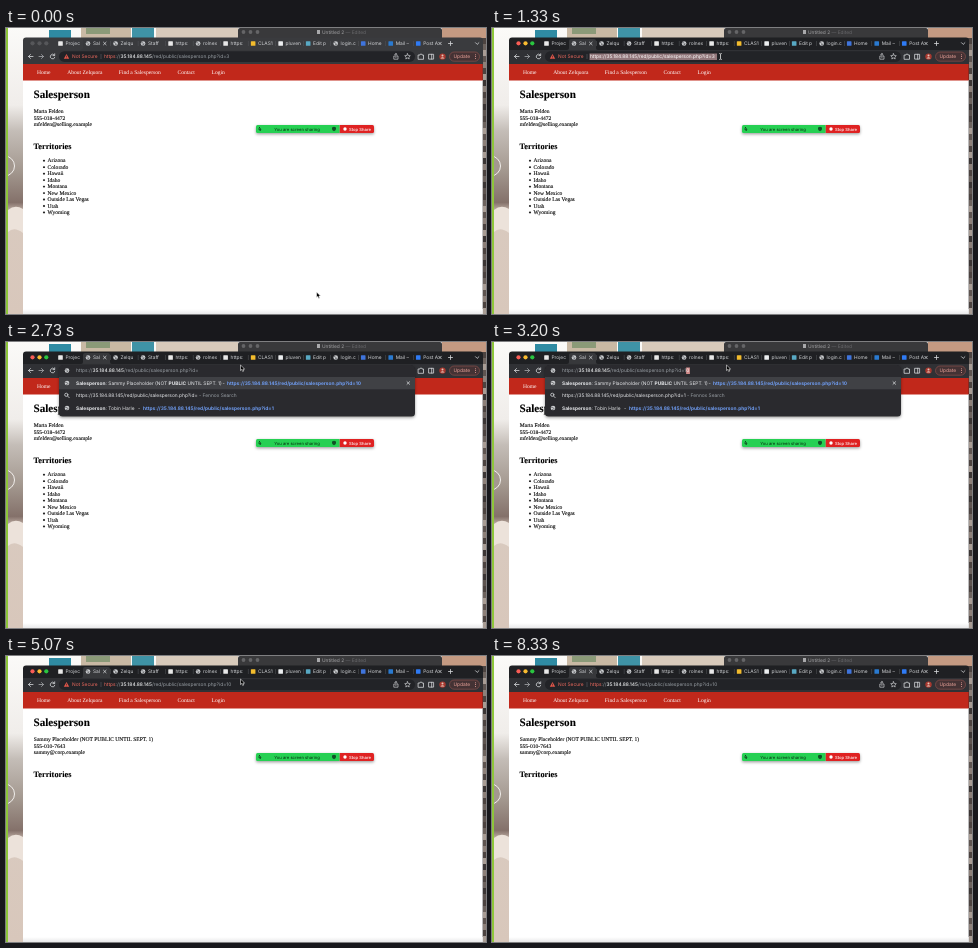
Animation of 480x286 px, one loop 8.54 s. Source, as an HTML page:

```html
<!DOCTYPE html>
<html lang="en">
<head>
<meta charset="utf-8">
<title>Salesperson</title>
<style>
html, body { margin: 0; width: 100%; height: 100%; overflow: hidden; background: #fff; }
svg { display: block; width: 480px; height: 286px; }
text { white-space: pre; text-rendering: geometricPrecision; }
.ui { font-family: Inter, "Open Sans", sans-serif; font-size: 4.85px; }
.page { font-family: "Liberation Serif", serif; font-size: 5.55px; }
.ink { stroke: #000; stroke-width: .1; }
.b { font-weight: 700; }
.line { fill: none; stroke: #d5d7da; stroke-width: .8; stroke-linecap: round; stroke-linejoin: round; }
</style>
</head>
<body>
<svg viewBox="0 0 480 286" xmlns="http://www.w3.org/2000/svg">
  <defs>
    <linearGradient id="wall" x2="0" y2="1">
      <stop offset="0" stop-color="#fbfaf8"/>
      <stop offset=".27" stop-color="#f0edea"/>
      <stop offset=".36" stop-color="#c4bdb7"/>
      <stop offset=".5" stop-color="#a3988f"/>
      <stop offset=".61" stop-color="#84716a"/>
      <stop offset=".65" stop-color="#d9cabf"/>
      <stop offset="1" stop-color="#d8c7bb"/>
    </linearGradient>
    <linearGradient id="foot" x2="0" y2="1">
      <stop offset="0" stop-color="#fff"/>
      <stop offset="1" stop-color="#e9e9ea"/>
    </linearGradient>
    <filter id="soft" x="-10%" y="-40%" width="120%" height="200%">
      <feDropShadow dx="0" dy="1.2" stdDeviation="1.6" flood-opacity=".4"/>
    </filter>
    <g id="globe">
      <circle r="2.3" fill="#d0d2d5"/>
      <path d="M-1.8-.6C-.7-1.6-.2.2.5-.2M-.6 1.7C-.4.7.7 1.2 1.4.4" fill="none" stroke="#3a3b3e" stroke-width=".75"/>
    </g>
  </defs>

  <rect width="480" height="286" fill="url(#wall)"/>
  <g id="shelf"></g>
  <circle cx="-1.500" cy="138" r="10" fill="#a3988f" stroke="#f2efec" stroke-width="1"/>
  <path d="M2 182Q9 176 17 181V205Q8 198 2 204Z" fill="#ece2da"/>
  <rect width="2" height="286" fill="#8ec63a"/>

  <path d="M232 10V2Q232 0 234 0H434Q436 0 436 2V10Z" fill="#39393b"/>
  <g fill="#656567"><circle cx="237.500" cy="4" r="1.900"/><circle cx="244.500" cy="4" r="1.900"/><circle cx="251.500" cy="4" r="1.900"/></g>
  <rect x="311" y="2" width="3" height="4" fill="#a9a9ab"/>
  <text class="ui" x="316" y="5.800" fill="#a4a4a6">Untitled 2 <tspan fill="#69696c">— Edited</tspan></text>

  <path id="strip" d="M17 286V12.500Q17 9.500 20 9.500H474Q477 9.500 477 12.500V286Z"/>
  <g id="lights">
    <circle cx="26.500" cy="15.300" r="2.100" fill="#fa5d56"/>
    <circle cx="33.500" cy="15.300" r="2.100" fill="#f9bb30"/>
    <circle cx="40.300" cy="15.300" r="2.100" fill="#2ac640"/>
  </g>
  <g id="dimmed" fill="#56575a">
    <circle cx="26.500" cy="15.300" r="2.100"/><circle cx="33.500" cy="15.300" r="2.100"/><circle cx="40.300" cy="15.300" r="2.100"/>
  </g>
  <path d="M75 22Q77 22 77 20V13Q77 11 79 11H102Q104 11 104 13V20Q104 22 106 22Z" fill="#37383b"/>
  <rect id="bar" x="17" y="22" width="460" height="14.500"/>
  <g id="tabs"></g>
  <path class="line" d="M97.500 14.200l2.600 2.600m0-2.600l-2.600 2.600M432.700 14.200l2.600 2.600m0-2.600l-2.600 2.600M442.500 15.500h4m-2-2v4M469.500 14.700l1.700 1.700 1.700-1.700"/>

  <path class="line" d="M27 28.500h-4.500m2-2l-2 2 2 2M48.300 27a2.300 2.300 0 1 0 .5 2.300M48.700 25.800v1.800h-1.800"/>
  <path class="line" d="M33 28.500h4.500m-2-2l2 2-2 2" style="stroke:#a5a7ab"/>
  <rect x="53" y="23.300" width="356" height="10.600" rx="5.300" fill="#222327"/>

  <g id="address" class="ui">
    <path d="M60.500 26l2.700 4.800h-5.400Z" fill="#e4574a"/>
    <path d="M60.500 27.700v1.400m0 .5v.6" stroke="#222327" stroke-width=".6"/>
    <text x="66" y="30.300" fill="#ee6a5e">Not Secure</text>
    <path d="M95 26v5" stroke="#5f6165" stroke-width=".6"/>
    <rect id="marked" x="97.500" y="25.500" width="127.500" height="6.500" fill="#92777b"/>
    <text id="url" x="98" y="30.300"></text>
  </g>

  <path class="line" d="M388.800 28h-1v3.200h4.200V28h-1M389.900 29.500v-4m-1.200 1.200l1.200-1.200 1.200 1.200M401.500 25.700l.8 1.800 2 .2-1.500 1.400.4 1.900-1.700-1-1.700 1 .4-1.900-1.500-1.400 2-.2Z" style="stroke-width:.65"/>
  <path d="M412.500 27h1.500a1 1 0 0 1 2 0h1.500v4.300h-5Z" class="line"/>
  <path d="M423 26.300h4.600v4.800H423Zm2.700 0v4.800" class="line"/>
  <circle cx="436.500" cy="28.600" r="3.200" fill="#a8382f"/>
  <circle cx="436.500" cy="27.500" r="1" fill="#e4c9bd"/>
  <path d="M434.500 30.600q2-2.600 4 0Z" fill="#e4c9bd"/>
  <rect x="443.500" y="24" width="30" height="9.200" rx="4.600" fill="#443234" stroke="#96554f" stroke-width=".6"/>
  <text class="ui" x="447.500" y="30.300" fill="#eda49b">Update</text>
  <g fill="#eda49b"><circle cx="469.500" cy="26.700" r=".5"/><circle cx="469.500" cy="28.600" r=".5"/><circle cx="469.500" cy="30.500" r=".5"/></g>

  <path d="M17 52H476.700V286H17Z" fill="#fff"/>
  <rect x="17" y="281" width="459.700" height="5" fill="url(#foot)"/>
  <rect x="17" y="36" width="459.700" height="16.500" fill="#c1281b"/>
  <g id="nav" class="page" fill="#fff"></g>
  <text class="page ink b" x="27.500" y="70" style="font-size:11.150px">Salesperson</text>
  <g id="person" class="page ink"></g>
  <text class="page ink b" x="27.500" y="120.600" style="font-size:8.300px">Territories</text>
  <g id="places" class="page ink"></g>

  <g filter="url(#soft)">
    <path d="M333.500 97H366.500Q368 97 368 98.500V103.500Q368 105 366.500 105H333.500Z" fill="#df2424"/>
    <path d="M333.500 97H251.500Q250 97 250 98.500V103.500Q250 105 251.500 105H333.500Z" fill="#27d052"/>
  </g>
  <g class="ui" style="font-size:4.200px">
    <path d="M253.200 99l1.800 3m-2.200-1.500q0 2 2 2" stroke="#0d3519" fill="none" stroke-width=".9"/>
    <text x="291" y="102.500" text-anchor="middle" fill="#06280f">You are screen sharing</text>
    <path d="M328 98.700l2 .7v1.600q0 1.400-2 2.200q-2-.8-2-2.200V99.400Z" fill="#125026"/>
    <circle cx="339" cy="101" r="1.700" fill="#fff"/>
    <text x="343" y="102.500" fill="#fff" font-weight="500">Stop Share</text>
  </g>

  <g id="drop" class="ui" fill="#e8eaed">
    <path id="panel" fill="#292a2d" filter="url(#soft)"/>
    <rect x="53" y="35" width="356" height="12.300" fill="#404145"/>
    <use href="#globe" x="61" y="28.600"/>
    <rect id="hint" x="195.600" y="25.500" width="3.800" height="6.500" fill="#cf8a89"/>
    <text id="typed" x="70" y="30.300"></text>
    <use href="#globe" x="61" y="41"/>
    <text x="70" y="42.800"><tspan class="b">Salesperson</tspan>: Sammy Placeholder (NOT <tspan class="b">PUBLIC</tspan> UNTIL SEPT. 1)</text>
    <text x="216.500" y="42.800">-</text>
    <text class="b" x="221" y="42.800" fill="#6f9df3">https://35.184.88.145/red/public/salesperson.php?id=10</text>
    <path class="line" d="M401 39.700l2.600 2.600m0-2.600l-2.600 2.600"/>
    <circle class="line" cx="60.300" cy="52.800" r="1.600"/>
    <path class="line" d="M61.600 54.100l1.600 1.600"/>
    <text id="search" x="70" y="55.300"></text>
    <g id="third">
      <use href="#globe" x="61" y="66"/>
      <text x="70" y="67.800"><tspan class="b">Salesperson</tspan>: Tobin Harle</text>
      <text x="132" y="67.800">-</text>
      <text class="b" x="137" y="67.800" fill="#6f9df3">https://35.184.88.145/red/public/salesperson.php?id=1</text>
    </g>
  </g>

  <path id="beam" d="M-1.200-3q1.200 0 1.200 .8q0-.8 1.200-.8M0-2.200V2.200M-1.200 3q1.200 0 1.200-.8q0 .8 1.200 .8" fill="none" stroke="#e6e6e6" stroke-width=".8"/>
  <path id="arrow" d="M0 0V5.600L1.300 4.400 2.200 6.500 3.300 6 2.400 4H4.100Z" fill="#000" stroke="#fff" stroke-width=".55"/>
</svg>
<script>
const $ = id => document.getElementById(id);
const TICKS = 128, LOOP = 8540, TICK = 1000 / 15;
const HOST = '35.184.88.145', PATH = '/red/public/salesperson.php?id=';

const label = (x, y, s, more = '') => `<text x="${x}" y="${y}" ${more}>${s}</text>`;
const rect = (x, y, w, h, fill) => `<rect x="${x}" y="${y}" width="${w}" height="${h}" fill="${fill}"/>`;
const show = (id, on) => $(id).setAttribute('visibility', on ? 'visible' : 'hidden');
const put = (id, html) => { if ($(id).dataset.v !== html) $(id).innerHTML = $(id).dataset.v = html; };
const span = (fill, s, more = '') => `<tspan fill="${fill}" ${more}>${s}</tspan>`;
const link = (scheme, id) => scheme + span('#f1f3f4', HOST, 'font-weight="500"') + span('#9aa0a6', PATH + id);

// Room seen above and to the right of the window
function drawShelf() {
  const tones = ['#4c4340', '#8d8079', '#5e5450', '#3b3534', '#a89c94', '#6d635e'];
  let out = rect(75, 0, 50, 10, '#c9b9a4') + rect(150, 0, 82, 10, '#d8cabb') + rect(436, 0, 44, 10, '#c49a82');
  out += rect(43, 2, 22, 8, '#2f8ba3') + rect(80, 0, 24, 6, '#8b9a78') + rect(126, 0, 22, 10, '#3f93a6');
  for (let i = 0; i < 48; i++) out += rect(476, 10 + i * 6, 4, 6, tones[i * 5 % 13 % 6]);
  $('shelf').innerHTML = out;
}

function drawTabs() {
  // Each tab: title, then icon colour (none means a globe)
  const tabs = [['Projec', '#e8e8e8'], ['Sal'], ['Zelqu'], ['Staff'], ['https:', '#e8e8e8'], ['rolnex'],
    ['https:', '#e8e8e8'], ['CLAS1', '#f3bc2d'], ['pluven', '#eceef0'], ['Edit p', '#58a9c4'],
    ['login.c'], ['Home', '#3f74dc'], ['Mail –', '#2a7ad0'], ['Post A', '#2f7bf5']];
  $('tabs').innerHTML = tabs.map(([name, color], i) => {
    const x = 54.5 + i * 27.52;
    const icon = color
      ? `<rect x="${x - 2.3}" y="13.2" width="4.6" height="4.6" rx=".6" fill="${color}"/>`
      : `<use href="#globe" x="${x}" y="15.5"/>`;
    const bar = i > 1 ? rect(x - 5.2, 13, .5, 5, '#55575b') : '';
    return icon + bar + label(x + 4.9, 17.3, name, 'class="ui" fill="#d4d6d9"');
  }).join('');
}

const lines = rows => rows.map((s, i) => label(27.8, 85.4 + i * 6.5, s)).join('');
const before = lines(['Marta Felden', '555-018-4472', 'mfelden@selling.example']);
const after = lines(['Sammy Placeholder (NOT PUBLIC UNTIL SEPT. 1)', '555-010-7643', 'sammy@corp.example']);

function drawPage() {
  $('nav').innerHTML = [[31, 'Home'], [61.3, 'About Zelquora'], [112.8, 'Find a Salesperson'],
    [171.5, 'Contact'], [205.5, 'Login']].map(([x, s]) => label(x, 46.2, s)).join('');
  $('places').innerHTML = ['Arizona', 'Colorado', 'Hawaii', 'Idaho', 'Montana', 'New Mexico',
    'Outside Las Vegas', 'Utah', 'Wyoming'].map((s, i) => {
      const y = 134.4 + i * 6.47;
      return `<circle cx="38" cy="${y - 1.7}" r=".9"/>` + label(41.6, y, s);
    }).join('');
}

// Pointer stops: tick, x, y
const stops = [[0, 310.5, 264], [7, 310.5, 264], [16, 228.5, 28.5], [32, 228.5, 28.5], [36, 234.5, 23],
  [89, 234.5, 23], [96, 253, 76.5], [98, 253, 76.5], [100, 259, 133], [102, 259, 133], [105, 259.5, 136.5],
  [107, 259.5, 136.5], [111, 328.5, 29.3], [113, 328.5, 29.3], [114, 401, 29.3], [TICKS, 401, 29.3]];

function pointer(n) {
  const i = Math.max(1, stops.findIndex(s => s[0] >= n));
  const [a, x0, y0] = stops[i - 1], [b, x1, y1] = stops[i];
  const k = (n - a) / (b - a), e = k * k * (3 - 2 * k);
  return [x0 + (x1 - x0) * e, y0 + (y1 - y0) * e];
}

function drawDrop(n) {
  const entry = n < 45 ? '' : n < 54 ? '1' : '10', hint = entry === '1', three = n < 54;
  $('panel').setAttribute('d', `M53 35V27Q53 23 57 23H405Q409 23 409 27V${three ? 71 : 58.5}q0 3.5-3.5 3.5H56.5q-3.5 0-3.5-3.5Z`);
  put('typed', link(span('#9aa0a6', 'https://'), entry) + (hint ? span('#fff', '0') : ''));
  $('hint').style.display = hint ? '' : 'none';
  if (hint) $('hint').setAttribute('x', $('typed').getComputedTextLength() + 66.7);
  put('search', `https://${HOST}${PATH}${entry}` + span('#9aa0a6', ' - Fennox Search'));
  $('third').style.display = three ? '' : 'none';
}

function draw(n) {
  const active = n >= 19, open = n >= 41 && n < 68, marked = n >= 19 && n < 24, loaded = n >= 74;
  $('strip').setAttribute('fill', active ? '#1f2023' : '#3a3b3e');
  $('bar').setAttribute('fill', active ? '#303135' : '#37383b');
  show('lights', active);
  show('dimmed', !active);

  show('address', !open);
  $('marked').style.display = marked ? '' : 'none';
  const id = n < 68 ? 3 : 10;
  put('url', marked
    ? span('#fff', `https://${HOST}${PATH}${id}`)
    : link(span('#ee6a5e', 'https') + span('#9aa0a6', '://'), id));

  $('drop').style.display = open ? '' : 'none';
  if (open) drawDrop(n);

  put('person', loaded ? after : before);
  show('places', !loaded);

  const [x, y] = pointer(n), text = n >= 16 && n < 33;
  for (const id of ['beam', 'arrow']) $(id).setAttribute('transform', `translate(${x} ${y})`);
  show('beam', text);
  show('arrow', !text && n < 125);
}

drawShelf();
drawTabs();
drawPage();
const start = performance.now();
function frame() {
  const t = (performance.now() - start) % LOOP;
  draw(Math.min(TICKS - 1, Math.floor(t / TICK + .05)));
  requestAnimationFrame(frame);
}
frame();
</script>
</body>
</html>
```
